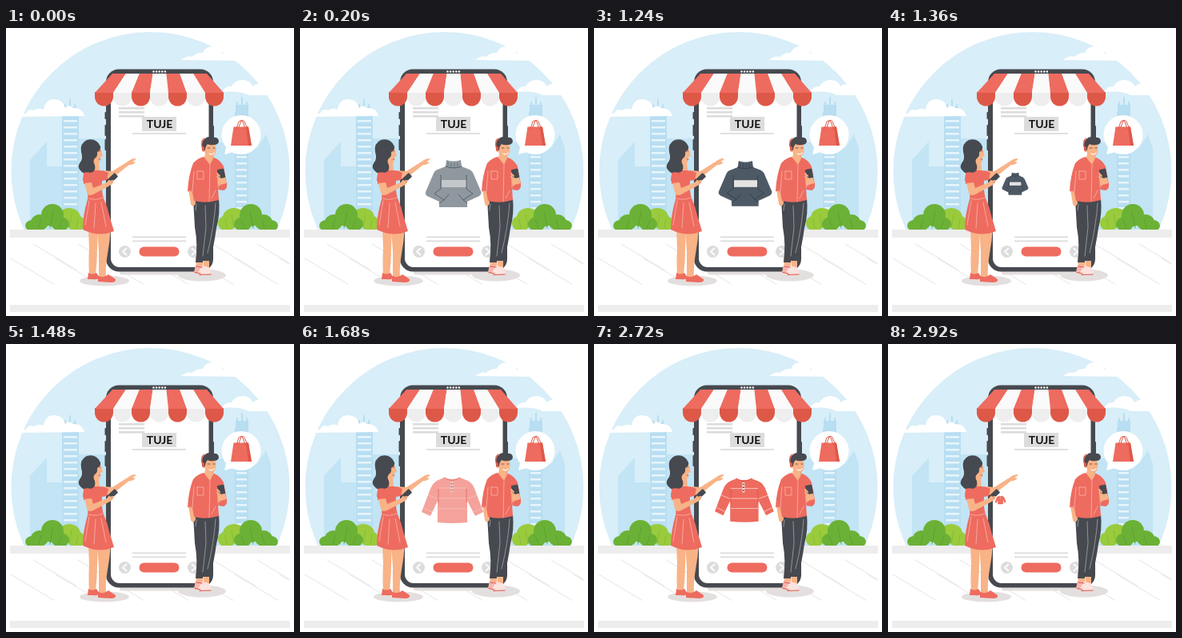
These frames come from a looping animation (360 px wide and 360 px high, 2960 ms). An HTML page with a canvas:

```html
<!DOCTYPE html>
<html lang="en">
<head>
<meta charset="utf-8">
<title>Online shop</title>
<style>
html, body { margin: 0; width: 100%; height: 100%; overflow: hidden; background: #fff; }
canvas { display: block; width: 360px; height: 360px; }
</style>
</head>
<body>
<canvas id="stage" width="360" height="360"></canvas>
<script>
const ctx = document.getElementById('stage').getContext('2d');
const RED = '#ee6b5f', DEEP = '#de5848', DARK = '#46494f', SKIN = '#f8b387', BLUSH = '#f9b5ad',
  SKY = '#d8eef8', TOWER = '#b8def2', PALE = '#c2e4f4', GREY = '#dcdcdc', WHITE = '#fff',
  SHADE = '#e3dfde', LEAF = '#6bb136', LIME = '#9acb3c';
const LOOP = 2960, STEP = 40, HALF = 1480;

const fill = (color, d) => { ctx.fillStyle = color; ctx.fill(new Path2D(d)); };
const line = (color, width, d) => {
  ctx.strokeStyle = color;
  ctx.lineWidth = width;
  ctx.stroke(new Path2D(d));
};
const rect = (color, x, y, w, h, r = 0) => {
  ctx.fillStyle = color;
  ctx.beginPath();
  ctx.roundRect(x, y, w, h, r);
  ctx.fill();
};
const oval = (color, x, y, rx, ry = rx) => {
  ctx.fillStyle = color;
  ctx.beginPath();
  ctx.ellipse(x, y, rx, ry, 0, 0, Math.PI * 2);
  ctx.fill();
};

function sky() {
  ctx.save();
  ctx.beginPath();
  ctx.rect(0, 0, 360, 252);
  ctx.clip();
  oval(SKY, 180.5, 179, 174);

  fill(PALE, 'M30 252V165L51 142V173H70V252ZM91 252V138H126V252Z');
  fill(PALE, 'M258 252V143H286V252ZM303 252V150H314L325 133L331 150V252Z');
  antenna(80, 90, 108);
  antenna(295, 87, 105);
  skyline(70, 108, 21);
  skyline(286, 105, 17);

  fill(WHITE, 'M14 111Q18 106 25 107Q28 100 35 103Q41 99 47 102Q49 89 60 89Q71 89 74 100Q79 95 84 100Q95 99 98 110Z');
  fill(WHITE, 'M219 40Q226 34 233 36Q237 31 246 31Q249 23 258 23Q268 24 271 32Q279 28 283 36Q294 36 300 41Z');
  fill(WHITE, 'M270 80Q274 72 282 73Q287 64 297 65Q306 66 308 73Q316 67 322 72Q336 69 348 84H303Q294 78 270 80Z');
  ctx.restore();
}

function skyline(x, y, w) {
  rect(TOWER, x, y, w, 252 - y);
  for (let row = y + 7; row < 225; row += 8) rect('#e7f5fb', x + 2, row, w - 4, 2.5);
}

function antenna(x, top, base) {
  line(TOWER, 2, `M${x} ${top}V${base}M${x - 6} ${top + 6}V${base}M${x + 6} ${top + 6}V${base}`);
  rect(TOWER, x - 8, base - 9, 16, 9);
}

// side = 1 puts the lime shrubs on the right, -1 on the left.
function bush(x, side) {
  ctx.save();
  ctx.translate(x, 0);
  ctx.scale(side, 1);
  oval(LIME, 18, 237, 14, 12);
  oval(LIME, 27, 244, 11, 10);
  oval(LEAF, -3, 234, 14);
  oval(LEAF, -19, 243, 11, 10);
  oval(LEAF, -28, 247, 9, 7);
  oval(LEAF, 7, 245, 11, 9);
  line('#5a9f31', .8, 'M-6 250L-2 229M-20 250L-17 239M5 250L9 240');
  line('#86b733', .8, 'M18 250L21 233M27 250L29 239');
  ctx.restore();
}

function ground() {
  ctx.save();
  ctx.beginPath();
  ctx.rect(0, 0, 360, 252);
  ctx.clip();
  bush(61, 1);
  bush(303, -1);
  ctx.restore();
  rect(WHITE, 0, 252, 360, 108);
  rect('#ededed', 5, 252, 350, 10);
  rect('#ededed', 5, 346, 350, 9);
  for (let i = 0; i < 13; i++) {
    const x = 6 + i * 28, y = i % 2 ? 270 : 288;
    line('#e6e6e6', 1, `M${x} ${y}L${Math.min(x + 54, 354)} ${y + Math.min(54, 354 - x) * .6}`);
  }
  oval(SHADE, 123, 316, 31, 6.5);
  oval(SHADE, 245, 309, 30, 7.5);
  rect(SHADE, 142, 300, 100, 8.5, 3);
}

function phone() {
  rect(DARK, 123.5, 105, 4, 9, 1);
  rect(DARK, 123.5, 121, 4, 14, 1);
  rect(DARK, 123.5, 139, 4, 14, 1);
  rect(DARK, 257, 122, 3, 20, 1);
  rect(DARK, 125, 51.5, 134, 253, 16);
  rect(WHITE, 131, 57, 122.5, 242, 11);
  for (let i = 0; i < 5; i++) oval(WHITE, 184.5 + i * 3.6, 54.5, 1.2);

  for (let i = 0; i < 3; i++) rect(GREY, 141, 99 + i * 5, 32, 2.6);
  rect(GREY, 170, 111, 43, 18);
  ctx.fillStyle = '#111';
  ctx.font = '700 14px Lato, sans-serif';
  ctx.textAlign = 'center';
  ctx.fillText('TUJE', 192, 125);
  rect(GREY, 158, 131, 67, 1.8);
  rect(GREY, 158, 260.5, 67, 1.8);
  rect(GREY, 158, 265.5, 67, 1.8);
  rect(RED, 166.5, 273.5, 50, 12, 6);
  oval(GREY, 148.5, 279.5, 7.5);
  oval(GREY, 234.5, 279.5, 7.5);
  line(WHITE, 1.8, 'M150.5 275.5L146 279.5L150.5 283.5M232.5 275.5L237 279.5L232.5 283.5');
}

function awning() {
  const topX = 133, topStripe = 118 / 7;
  for (let i = 0; i < 7; i++) {
    const left = 111 + i * 23, right = left + 23;
    const topL = topX + i * topStripe, topR = topL + topStripe;
    fill(i % 2 ? '#eeeeee' : DEEP, `M${left} 80H${right}V86A11.5 11.5 0 0 1 ${left} 86Z`);
    fill(i % 2 ? '#fafafa' : RED, `M${topL} 57H${topR}L${right} 81H${left}Z`);
  }
}

function bubble() {
  fill(WHITE, 'M276 145L273 158L288 154Z');
  oval(WHITE, 294, 133.5, 24.5);
  fill(RED, 'M284.5 123.5H303L307 147H281Z');
  fill(DEEP, 'M303 123.5L307 147H303L300 123.5Z');
  line(DEEP, 1, 'M288 126L291 117Q294 114 296 117L299 126M291 124L294 116Q297 114 298 117L301 124');
}

function woman() {
  // Legs and shoes
  fill(SKIN, 'M103 250H115L114 276Q114 292 112 309L104 311Q103 291 104 276Z');
  fill(SKIN, 'M114 250H131Q130 266 127 282Q124 299 125 312L116 313Q116 295 116 280Z');
  fill(RED, 'M103 306Q108 309 113 306L117 312Q115 315 108 314L102 314Z');
  fill(RED, 'M115 310Q123 313 128 308L137 314Q138 318 131 318L115 317Z');
  // Far arm
  fill(SKIN, 'M120 178L133 179L152 167Q157 163 162 163Q163 165 158 167L162 168Q158 172 154 171L135 186Q130 189 122 189Z');
  // Neck and dress
  fill(SKIN, 'M107 166L116 165L117 179L106 181Z');
  fill(RED, 'M100 179Q107 175 111 178L117 178Q123 178 128 181L126 190L120 191Q119 203 122 213Q127 224 129 234L135 254Q116 262 96 252Q96 234 102 214L103 199L96 191Q96 182 100 179Z');
  line(BLUSH, .8, 'M104 216L99 246M112 219L110 250M119 218L125 248M103 213Q112 216 121 212');
  // Head and hair
  fill(SKIN, 'M108 149Q117 147 119 153L121 160L118 161Q119 168 114 169L107 166Z');
  fill(DARK, 'M118 148Q119 153 114 155Q115 160 111 163Q108 166 111 171Q113 180 105 181Q99 185 93 178Q89 175 92 169Q97 164 94 155Q92 144 101 140Q113 137 118 148Z');
  line('#9b493e', .7, 'M116 154L118 154M116 164L118 164');
  // Near arm and handset
  fill(RED, 'M97 181Q107 178 109 186L109 194L97 195Z');
  fill(SKIN, 'M98 194L107 193L109 200L126 193L130 188L135 190L133 195L126 199L109 208Q102 211 101 205Z');
  ctx.save();
  ctx.translate(134, 187);
  ctx.rotate(-.75);
  rect(DARK, -5.5, -3.2, 11, 6.4, 1);
  ctx.restore();
  line(SKIN, 2, 'M129 192L134 191');
}

function man() {
  // Legs and shoes
  fill(SKIN, 'M237 286H246V299H238ZM246 286H254V300H247Z');
  fill(DARK, 'M234 214Q249 220 266 213Q268 232 263 250Q260 272 255 291L246 291L246 293L237 293Q240 270 236 249Z');
  line('#a3a6ab', .8, 'M249 222L250 249L246 285M238 220L237 228M262 219Q260 249 252 281');
  fill(BLUSH, 'M237 296L246 297L247 305Q241 308 235 305Z');
  fill('#fbe3df', 'M245 297L253 299L257 305Q253 310 244 309L240 306Z');
  line(DEEP, 1.2, 'M236 305.5L243 307M242 308.5L256 308M238 298L245 299');
  // Hanging arm and torso
  fill(SKIN, 'M228 202L236 202L237 219Q234 226 231 220Z');
  fill(RED, 'M247 161Q253 166 260 162Q268 165 272 173L276 195Q276 201 268 202L265 200L266 215Q250 220 235 216L233 205L227 204Q228 184 234 169Q239 163 247 161Z');
  fill(SKIN, 'M249 157H258L259 163L255 171L248 162Z');
  line(BLUSH, .8, 'M235 179L233 204M255 171L254 217M239 179H247V189H239V179ZM265 178L265 199M228 204H233M262 203L257 213');
  // Head
  oval(SKIN, 247.5, 152, 2.2, 3);
  fill(SKIN, 'M248 145Q254 140 261 144Q264 152 261 158Q256 165 250 159Q247 154 248 145Z');
  fill(DARK, 'M246 152Q243 143 248 139Q252 134 258 137Q266 136 266 142Q265 146 260 146Q255 147 252 145Q249 148 249 153Z');
  line(DEEP, 1.4, 'M245.5 150Q243 141 248 138');
  oval(DEEP, 246.5, 151, 1.6, 3);
  line(DARK, .8, 'M252 150H255M259 150H261');
  line(WHITE, 1.2, 'M254 157Q258 159 260 156');
  // Raised arm and handset
  fill(SKIN, 'M265 195L264 184Q266 177 270 179L273 184L275 191L276 199L269 202Z');
  fill(RED, 'M268 196L276 194Q277 201 272 203L265 202Z');
  ctx.save();
  ctx.translate(269, 182);
  ctx.rotate(-.2);
  rect(DARK, -4.3, -5.8, 8.6, 11.6, 1.2);
  ctx.restore();
  line(SKIN, 1.8, 'M264 182L267 185M264 186L268 188');
}

function sweater() {
  fill('#4d5a66', 'M183 165Q192 168 201 165L202 173L212 177Q216 179 218 185L226.5 205Q227 209 222 211L209 217V224H174V217L161 211Q156 209 157 205L166 184Q168 178 172 177L182 173Z');
  rect('#e4e4e2', 177, 190, 31, 9);
  line('#35414b', 1, 'M182 173Q192 177 202 173M176 184L176 201L168 207L180 215L174 219M208 184L208 201L216 207L204 215L209 219M180 215L186 208M204 215L198 208');
  line('#35414b', .6, 'M185 168V172M189 169V174M193 169V174M197 169V173');
}

function shirt() {
  fill(RED, 'M180 167Q190 171 200 167L210 171Q216 174 219 183L229 210L219 215L209 196V223Q191 225 172 223V196L163 215L152 210L163 181Q166 173 173 170Z');
  line(DEEP, 1, 'M173 181V198M208 181V198M180 167Q190 174 200 167');
  line('#fbd0c9', .9, 'M173 180H208M173 193H208M173 206H208M155 205L165 210M217 210L227 205M161 189L171 193M210 193L221 189');
  rect('#f7e4dc', 188, 172, 3, 13);
  for (let i = 0; i < 3; i++) oval(DARK, 189.5, 174.5 + i * 4, 1);
}

// Each product fades in, rests, then eases into the woman's handset.
function product(draw, t) {
  const shown = Math.min(t / 320, 1);
  const leave = Math.max(0, (t - 1200) / 280);
  const eased = (1 - Math.cos(Math.PI * leave)) / 2;
  const size = 1 - .86 * eased;
  ctx.save();
  ctx.globalAlpha = shown;
  ctx.translate(191 - 53 * eased, 195);
  ctx.scale(size, size);
  ctx.translate(-191, -195);
  draw();
  ctx.restore();
}

function frame(now) {
  const t = Math.floor(now % LOOP / STEP) * STEP;
  ctx.lineCap = ctx.lineJoin = 'round';
  rect(WHITE, 0, 0, 360, 360);
  sky();
  ground();
  phone();
  awning();
  bubble();
  woman();
  man();
  product(t < HALF ? sweater : shirt, t % HALF);
}

const start = performance.now();
function loop() {
  frame(performance.now() - start);
  requestAnimationFrame(loop);
}
loop();
</script>
</body>
</html>
```
